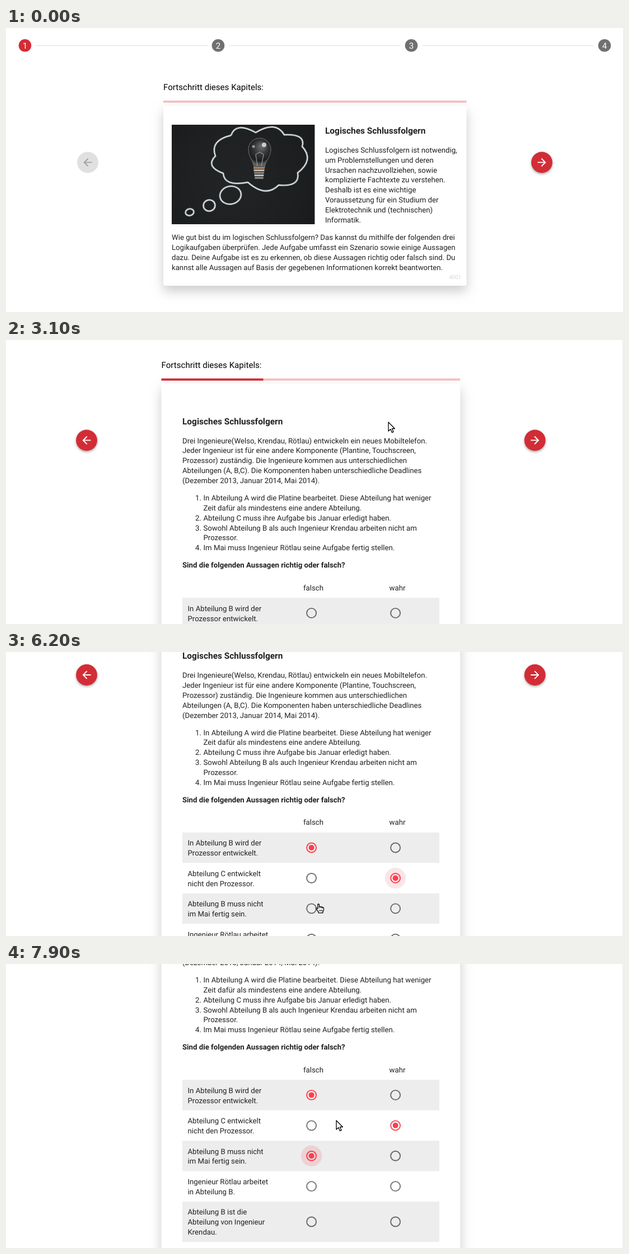
An HTML page with a canvas for the animation above (8 s loop, 1102 px wide and 508 px high).

```html
<!DOCTYPE html>
<html lang="de">
<head>
<meta charset="utf-8">
<title>Logisches Schlussfolgern</title>
<style>
html, body { margin: 0; width: 100%; height: 100%; overflow: hidden; background: #fff; }
canvas { display: block; }
</style>
</head>
<body>
<canvas id="stage" width="1102" height="508"></canvas>
<script>
const W = 1102, H = 508, LOOP = 8000, STEP = 100;
const ctx = document.getElementById('stage').getContext('2d');
const RED = '#d22d36', PICK = '#fb3f4e', INK = '#212121';
const BODY = '13.2px', LABEL = '15.1px', HEAD = '15.45px', LINE = 17.86;

// time, value...
const SCROLL = [[3000, 0], [3100, 61], [3300, 110], [3500, 152.3], [3600, 159.7], [3700, 159.7],
  [3800, 169], [4000, 190], [4200, 199.4], [6600, 199.4], [6700, 216], [6900, 308],
  [7000, 319.6], [7700, 319.6], [7800, 318.6], [7900, 315]];
const POINTER = [[800, 1082, 374], [1600, 962, 242.5], [1800, 962, 242.5], [2400, 683, 147],
  [3100, 683, 147], [3500, 712, 153], [3700, 712, 153], [4200, 552, 347], [4700, 552, 347],
  [5200, 685, 449], [5500, 685, 449], [5700, 697, 399], [5800, 697, 399], [6100, 547, 451],
  [6200, 558, 450], [6600, 558, 450], [7000, 590, 280]];
const HAND = [[1500, 1900], [4200, 4800], [5700, 5900], [6100, 6700]];
const NEXT_PAGE = 1900;

const INTRO = ['Logisches Schlussfolgern ist notwendig,', 'um Problemstellungen und deren',
  'Ursachen nachzuvollziehen, sowie', 'komplizierte Fachtexte zu verstehen.',
  'Deshalb ist es eine wichtige', 'Voraussetzung für ein Studium der',
  'Elektrotechnik und (technischen)', 'Informatik.'];
const QUIZ_INFO = ['Wie gut bist du im logischen Schlussfolgern? Das kannst du mithilfe der folgenden drei',
  'Logikaufgaben überprüfen. Jede Aufgabe umfasst ein Szenario sowie einige Aussagen',
  'dazu. Deine Aufgabe ist es zu erkennen, ob diese Aussagen richtig oder falsch sind. Du',
  'kannst alle Aussagen auf Basis der gegebenen Informationen korrekt beantworten.'];
const SCENARIO = ['Drei Ingenieure(Welso, Krendau, Rötlau) entwickeln ein neues Mobiltelefon.',
  'Jeder Ingenieur ist für eine andere Komponente (Plantine, Touchscreen,',
  'Prozessor) zuständig. Die Ingenieure kommen aus unterschiedlichen',
  'Abteilungen (A, B,C). Die Komponenten haben unterschiedliche Deadlines',
  '(Dezember 2013, Januar 2014, Mai 2014).'];
const FACTS = ['In Abteilung A wird die Platine bearbeitet. Diese Abteilung hat weniger',
  'Zeit dafür als mindestens eine andere Abteilung.',
  'Abteilung C muss ihre Aufgabe bis Januar erledigt haben.',
  'Sowohl Abteilung B als auch Ingenieur Krendau arbeiten nicht am', 'Prozessor.',
  'Im Mai muss Ingenieur Rötlau seine Aufgabe fertig stellen.'];
const FACT_LINES = [0, 2, 3, 5];
// click: column, selection time, end of focus halo, halo strength
const ROWS = [
  { text: ['In Abteilung B wird der', 'Prozessor entwickelt.'], click: [0, 4700, 5700, .16] },
  { text: ['Abteilung C entwickelt', 'nicht den Prozessor.'], click: [1, 5700, 6500, .13] },
  { text: ['Abteilung B muss nicht', 'im Mai fertig sein.'], click: [0, 6500, LOOP, .15] },
  { text: ['Ingenieur Rötlau arbeitet', 'in Abteilung B.'] },
  { text: ['Abteilung B ist die', 'Abteilung von Ingenieur', 'Krendau.'] },
  { text: ['Ingenieur Welso arbeitet', 'nicht am Touchscreen.'] }
];
const ARROW_ICON = new Path2D('M12 4l-1.41 1.41L16.17 11H4v2h12.17l-5.58 5.59L12 20l8-8z');
const CURSOR_ARROW = new Path2D('M0 0V16L3.9 12.4L6.4 18.4L9 17.3L6.5 11.5H11.4Z');
const CURSOR_HAND = new Path2D('M3.8 1.5Q5 0 6.4 1.5V5.6Q8.2 4.4 9.2 6.1Q10.8 5.2 11.9 6.9' +
  'Q14 6.2 14.4 8.4V11.6L12.9 14.6V16.6H5V14.5L.8 9.6Q.2 7.4 2.3 7.9L3.8 9.6Z');

function sample(keys, t) {
  if (t <= keys[0][0]) return keys[0].slice(1);
  for (let i = 1; i < keys.length; i++) {
    const a = keys[i - 1], b = keys[i];
    if (t <= b[0]) {
      const p = (t - a[0]) / (b[0] - a[0]);
      return a.slice(1).map((v, k) => v + (b[k + 1] - v) * p);
    }
  }
  return keys[keys.length - 1].slice(1);
}

function text(str, x, y, size = BODY, color = INK, align = 'left', weight = 400) {
  ctx.font = `${weight} ${size} Roboto, sans-serif`;
  ctx.fillStyle = color;
  ctx.textAlign = align;
  ctx.fillText(str, x, y);
}

function lines(list, x, y) {
  list.forEach((s, i) => text(s, x, y + i * LINE));
}

function rect(x, y, w, h, color) {
  ctx.fillStyle = color;
  ctx.fillRect(x, y, w, h);
}

function disc(x, y, r, color) {
  ctx.fillStyle = color;
  ctx.beginPath();
  ctx.arc(x, y, r, 0, Math.PI * 2);
  ctx.fill();
}

function roundBox(x, y, w, h, r) {
  ctx.beginPath();
  ctx.roundRect(x, y, w, h, r);
  ctx.fill();
}

// Only the shadow lands on stage: the caster sits far to the left.
function shadow(x, y, w, h, r, dy, blur, alpha) {
  ctx.save();
  ctx.fillStyle = '#000';
  ctx.shadowColor = `rgba(0,0,0,${alpha})`;
  ctx.shadowBlur = blur;
  ctx.shadowOffsetX = 3000;
  ctx.shadowOffsetY = dy;
  roundBox(x - 3000, y, w, h, r);
  ctx.restore();
}

function card(x, y, w, h) {
  shadow(x, y, w, h, 4, 9.4, 20, .2);
  ctx.fillStyle = '#fff';
  roundBox(x, y, w, h, 4);
}

function roundButton(x, y, dir, active) {
  if (active) shadow(x - 18.9, y - 18.9, 37.8, 37.8, 18.9, 1.9, 4.7, .36);
  disc(x, y, 18.9, active ? RED : '#e0e0e0');
  ctx.save();
  ctx.translate(x, y);
  ctx.scale(.943 * dir, .943);
  ctx.translate(-12, -12);
  ctx.fillStyle = active ? '#fff' : '#a0a0a0';
  ctx.fill(ARROW_ICON);
  ctx.restore();
}

function stepper(first, last) {
  const gap = (last - first) / 3;
  for (let i = 0; i < 4; i++) {
    const x = first + i * gap;
    disc(x, 31.3, 11.3, i ? '#707070' : RED);
    text(i + 1, x, 37, LABEL, '#fff', 'center');
    if (i < 3) rect(x + 19, 31, gap - 37.5, 1, '#e0e0e0');
  }
}

function progress(x, w, done) {
  text('Fortschritt dieses Kapitels:', x, 111, LABEL, '#000');
  rect(x, 129.8, w, 3.8, '#f5bfc0');
  rect(x, 129.8, w * done, 3.8, RED);
}

function chalk(path) {
  ctx.strokeStyle = 'rgba(205,222,228,.4)';
  ctx.lineWidth = 3.6;
  ctx.stroke(path);
  ctx.strokeStyle = 'rgba(228,238,241,.92)';
  ctx.lineWidth = 1.9;
  ctx.stroke(path);
}

function picture() {
  const bg = ctx.createRadialGradient(400, 275, 20, 415, 265, 165);
  bg.addColorStop(0, '#222324');
  bg.addColorStop(.6, '#1e1f20');
  bg.addColorStop(1, '#191a1b');
  rect(296, 173, 255.4, 178, bg);

  const knots = [[402, 192], [446, 187], [497, 191], [529, 212], [521, 259], [487, 281],
    [432, 276], [388, 260], [374, 229]];
  const cloud = new Path2D();
  cloud.moveTo(...knots[0]);
  knots.forEach((a, i) => {
    const b = knots[(i + 1) % knots.length];
    const mx = (a[0] + b[0]) / 2, my = (a[1] + b[1]) / 2;
    const d = Math.hypot(mx - 452, my - 235);
    cloud.quadraticCurveTo(mx + (mx - 452) / d * 26, my + (my - 235) / d * 26, b[0], b[1]);
  });
  chalk(cloud);
  for (const [x, y, rx, ry] of [[401, 299, 19, 16], [363, 317.5, 10.5, 10], [328, 329.5, 7.5, 6]]) {
    const bubble = new Path2D();
    bubble.ellipse(x, y, rx, ry, -.2, 0, Math.PI * 2);
    chalk(bubble);
  }

  const bulb = new Path2D('M443 250C442 237 433 231 433 217A20 20 0 0 1 473 217C473 231 463 237 462 250');
  const glass = ctx.createRadialGradient(457, 211, 2, 453, 218, 26);
  glass.addColorStop(0, '#6a6b6c');
  glass.addColorStop(.45, '#343536');
  glass.addColorStop(.8, '#1c1d1e');
  glass.addColorStop(1, '#5c5d5e');
  ctx.fillStyle = glass;
  ctx.fill(bulb);
  ctx.strokeStyle = '#747576';
  ctx.lineWidth = 1;
  ctx.stroke(bulb);
  ctx.strokeStyle = '#a9abac';
  ctx.stroke(new Path2D('M449 247L446 226L453 222L460 226L456 247'));
  disc(461, 209, 4, 'rgba(255,255,255,.7)');
  disc(442, 212, 2.5, 'rgba(255,255,255,.5)');
  rect(442, 249, 20, 3, '#b5835a');
  for (let i = 0; i < 4; i++) rect(442.5 + i * .6, 253 + i * 4.5, 19 - i * 1.2, 3.2, i % 2 ? '#8d8e8c' : '#bdbdb8');
}

function introPage() {
  stepper(33.9, 1069);
  progress(281, 541.5, 0);
  card(281, 139, 541.5, 322);
  picture();
  text('Logisches Schlussfolgern', 570, 189.3, HEAD, INK, 'left', 700);
  lines(INTRO, 570, 222.9);
  lines(QUIZ_INFO, 296, 379);
  text('4001', 813, 449, '9.6px', '#d6d6d6', 'right');
  roundButton(146, 240.4, -1, false);
  roundButton(957, 240.4, 1, true);
}

function radio(x, y, on, halo) {
  if (halo) disc(x, y, 18.7, `rgba(225,55,78,${halo})`);
  ctx.strokeStyle = on ? PICK : 'rgba(0,0,0,.56)';
  ctx.lineWidth = 1.9;
  ctx.beginPath();
  ctx.arc(x, y, 8.5, 0, Math.PI * 2);
  ctx.stroke();
  if (on) disc(x, y, 5, PICK);
}

function quizTable(t) {
  let y = 522.2;
  text('falsch', 549, 508.6, BODY, INK, 'center');
  text('wahr', 699, 508.6, BODY, INK, 'center');
  ROWS.forEach((row, i) => {
    const h = 18.7 + row.text.length * LINE;
    if (i % 2 === 0) rect(315, y, 459, h, '#ededed');
    lines(row.text, 324.5, y + 23.5);
    const [col, from, until, strength] = row.click || [-1, LOOP, LOOP, 0];
    [545.6, 695.6].forEach((x, c) => {
      const on = c === col && t >= from;
      radio(x, y + h / 2, on, on && t < until ? strength : 0);
    });
    y += h;
  });
}

function quizPage(t) {
  ctx.save();
  ctx.translate(0, -sample(SCROLL, t)[0]);
  stepper(34.2, 1055);
  const p = Math.min(1, (t - NEXT_PAGE) / 300);
  progress(277.5, 533.7, .341 * (1 - (1 - p) ** 2));
  card(277.5, 139, 533.7, 860);
  text('Logisches Schlussfolgern', 315, 211.6, HEAD, INK, 'left', 700);
  lines(SCENARIO, 315, 245.6);
  lines(FACTS, 352.5, 348);
  FACT_LINES.forEach((n, i) => text(`${i + 1}.`, 349, 348 + n * LINE, BODY, INK, 'right'));
  text('Sind die folgenden Aussagen richtig oder falsch?', 315, 468.4, BODY, INK, 'left', 700);
  quizTable(t);
  roundButton(144, 240.4, -1, true);
  roundButton(944.7, 240.4, 1, true);
  ctx.restore();
  rect(1101, 0, 1, H, '#ececec');
}

function cursor(t) {
  if (t < POINTER[0][0]) return;
  const [x, y] = sample(POINTER, t);
  const hand = HAND.some(([a, b]) => t >= a && t < b);
  const shape = hand ? CURSOR_HAND : CURSOR_ARROW;
  ctx.save();
  ctx.translate(hand ? x - 5 : x, y);
  ctx.fillStyle = '#fff';
  ctx.fill(shape);
  ctx.strokeStyle = '#000';
  ctx.lineWidth = 1.3;
  ctx.lineJoin = 'round';
  ctx.stroke(shape);
  if (hand) {
    ctx.lineWidth = 1;
    ctx.stroke(new Path2D('M6.4 5.6V8.5M9.2 6.1V8.5M11.9 6.9V9M7 11V14M9.2 11V14M11.4 11V14'));
  }
  ctx.restore();
}

function frame(now) {
  const t = Math.floor(now % LOOP / STEP) * STEP;
  ctx.textRendering = 'geometricPrecision';
  rect(0, 0, W, H, '#fff');
  if (t < NEXT_PAGE) introPage(); else quizPage(t);
  cursor(t);
}

const start = performance.now();
function tick() {
  frame(performance.now() - start);
  requestAnimationFrame(tick);
}
tick();
</script>
</body>
</html>
```
